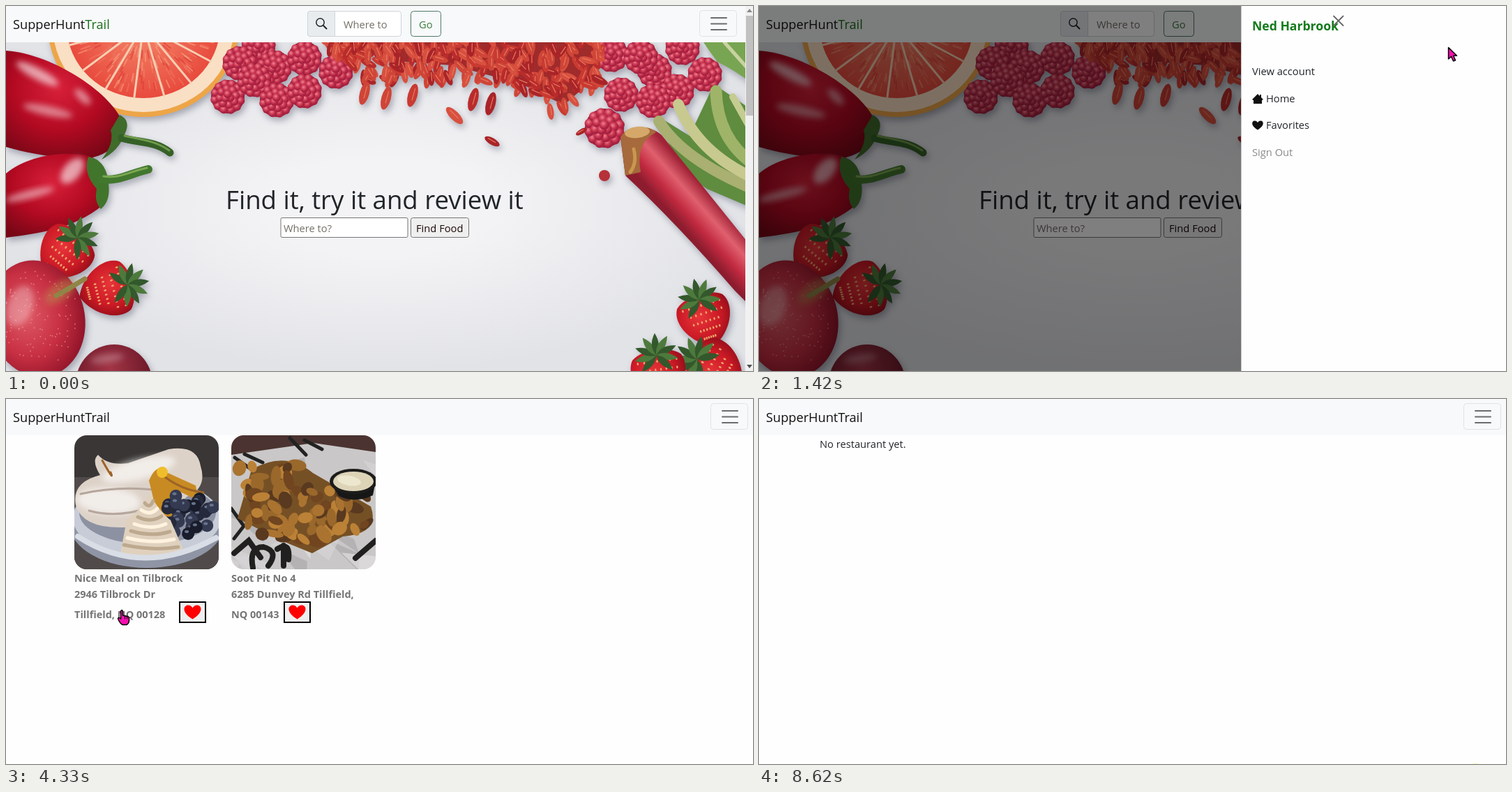
Recreate the animation shown at these times as an HTML page. Size 1071 by 523 pixels, loop 8680 ms.

```html
<!DOCTYPE html>
<html lang="en">
<head>
<meta charset="utf-8">
<title>Restaurant favorites</title>
<style>
html, body { margin: 0; width: 100%; height: 100%; overflow: hidden; background: #fefefe; }
svg { display: block; width: 100vw; height: 100vh; }
text { font-family: "Open Sans", "Noto Sans", sans-serif; white-space: pre; }
</style>
</head>
<body>
<svg id="stage" viewBox="0 0 1071 523" xmlns="http://www.w3.org/2000/svg">
<defs>
  <radialGradient id="table"><stop offset=".3" stop-color="#f3f3f5"/><stop offset="1" stop-color="#e2e3e7"/></radialGradient>
  <radialGradient id="drupe" cx=".4" cy=".35"><stop offset="0" stop-color="#ee8597"/><stop offset=".5" stop-color="#d3415a"/><stop offset="1" stop-color="#a92140"/></radialGradient>
  <radialGradient id="red" cx=".4" cy=".4" r=".65"><stop offset="0" stop-color="#e8353a"/><stop offset=".6" stop-color="#cb1a26"/><stop offset="1" stop-color="#8e0d18"/></radialGradient>
  <radialGradient id="pepper" cx=".45" cy=".35" r=".7"><stop offset="0" stop-color="#d8203a"/><stop offset=".55" stop-color="#b30a22"/><stop offset="1" stop-color="#780716"/></radialGradient>
  <radialGradient id="apple" cx=".4" cy=".45" r=".6"><stop offset="0" stop-color="#df5a65"/><stop offset=".6" stop-color="#c72f42"/><stop offset="1" stop-color="#94152a"/></radialGradient>
  <radialGradient id="plum" cx=".45" cy=".3" r=".7"><stop offset="0" stop-color="#a33546"/><stop offset="1" stop-color="#5b1020"/></radialGradient>
  <radialGradient id="flesh"><stop offset="0" stop-color="#f58a6c"/><stop offset="1" stop-color="#e84b3d"/></radialGradient>
  <linearGradient id="stalk" gradientUnits="userSpaceOnUse" x1="1000" y1="260" x2="955" y2="300"><stop offset="0" stop-color="#a02336"/><stop offset=".35" stop-color="#e0606e"/><stop offset=".7" stop-color="#c22a40"/><stop offset="1" stop-color="#8c1c2e"/></linearGradient>
  <linearGradient id="sky" x2="0" y2="1"><stop offset="0" stop-color="#8eabc9"/><stop offset="1" stop-color="#e6ebef"/></linearGradient>
  <filter id="soft" x="-50%" y="-50%" width="200%" height="200%"><feGaussianBlur stdDeviation="4"/></filter>
  <clipPath id="hero"><rect y="52" width="1071" height="471"/></clipPath>
  <clipPath id="photo"><rect width="207" height="192" rx="18"/></clipPath>
</defs>
</svg>
<script>
const LOOP = 8680;
const stage = document.getElementById('stage');

let seed = 7;
const rnd = (lo = 0, hi = 1) => {
  seed = (seed * 16807) % 2147483647;
  return lo + (hi - lo) * seed / 2147483647;
};
const pick = list => list[Math.floor(rnd(0, list.length))];
const repeat = (n, fn) => Array.from({ length: n }, (_, i) => fn(i)).join('');

// Drawing helpers
const path = (d, fill, more = '') => `<path d="${d}" fill="${fill}" ${more}/>`;
const line = (d, color, width, more = '') =>
  path(d, 'none', `stroke="${color}" stroke-width="${width}" stroke-linecap="round" ${more}`);
const oval = (x, y, rx, ry, fill, rot = 0, more = '') =>
  `<ellipse cx="${x}" cy="${y}" rx="${rx}" ry="${ry}" fill="${fill}" transform="rotate(${rot} ${x} ${y})" ${more}/>`;
const box = (x, y, w, h, fill, more = '') =>
  `<rect x="${x}" y="${y}" width="${w}" height="${h}" fill="${fill}" ${more}/>`;
const text = (x, y, str, size = 14.7, fill = '#212529', more = '') =>
  `<text x="${x}" y="${y}" font-size="${size}" fill="${fill}" ${more}>${str}</text>`;
const at = (x, y, body, more = '') => `<g transform="translate(${x} ${y}) ${more}">${body}</g>`;
const group = (id, body) => `<g id="${id}">${body}</g>`;
const shine = (x, y, rx, ry, rot, opacity = .6) =>
  oval(x, y, rx, ry, '#fff', rot, `opacity="${opacity}" filter="url(#soft)"`);
const heart = fill => path('M0 10C-18-1-12-11-6-10C-3-10-1-8 0-6C1-8 3-10 6-10C12-11 18-1 0 10Z', fill);

// Fruit
const raspberry = (x, y, r = 24) => oval(x, y, r, r, '#9c1d3a') +
  [[12, .8], [8, .48], [3, .16]].map(([n, ring]) => repeat(n, i => {
    const a = i / n * 2 * Math.PI + ring * 3;
    return oval(x + Math.cos(a) * r * ring, y + Math.sin(a) * r * ring, r * .25, r * .25, 'url(#drupe)');
  })).join('');

const leaf = 'M0 0Q10-12 2-30Q-9-14 0 0Z';
const strawberry = (x, y, scale, rot) => at(x, y,
  path('M0 44C-30 32-48-4-35-24C-20-38 20-38 35-24C48-4 30 32 0 44Z', 'url(#red)') +
  repeat(34, i => {
    const row = Math.floor(i / 7), reach = 28 - row * 4.5;
    return oval((i % 7 - 3 + row % 2 / 2) / 3 * reach, -18 + row * 12, 1.3, 2, '#eda36a');
  }) +
  repeat(9, i => at(0, -27, path(leaf, i % 2 ? '#4d7a3c' : '#33582c'), `rotate(${i * 34 - 136}) scale(1.05)`)),
  `rotate(${rot}) scale(${scale})`);

const grapefruit = oval(197, 28, 137, 131, '#eda548') + oval(197, 28, 130, 124, '#f9dfc4') +
  oval(197, 28, 110, 104, 'url(#flesh)') +
  repeat(160, () => {
    const a = rnd(0, Math.PI), d = rnd(25, 92), c = Math.cos(a), s = Math.sin(a);
    return line(`M${197 + c * d} ${28 + s * d}l${c * 12} ${s * 11}`, pick(['#f9a184', '#d93a33', '#f27660']), 2, 'opacity=".6"');
  }) +
  repeat(9, i => {
    const a = i * Math.PI / 8 + .12;
    return line(`M197 28L${197 + 110 * Math.cos(a)} ${28 + 104 * Math.sin(a)}`, '#f8cdb2', 3);
  });

const peppers =
  path('M0 64C62 68 142 118 164 160C174 194 144 221 100 219C58 216 24 209 0 202Z', 'url(#pepper)') +
  shine(45, 97, 34, 8, 28) + shine(60, 150, 36, 7, 12, .45) + shine(110, 130, 15, 6, 45, .5) +
  path('M163 156Q180 164 170 184Q162 207 137 220Q156 196 150 178Z', '#3f6b2b') +
  line('M166 189C190 196 214 193 235 210', '#356026', 11) + line('M170 186C196 192 214 193 234 207', '#6f9a4b', 3) +
  path('M0 240C32 214 84 206 122 216C148 228 153 264 139 285C98 320 44 326 0 332Z', 'url(#pepper)') +
  shine(95, 236, 12, 22, 40) + shine(34, 270, 36, 6, -14, .5) +
  path('M118 216Q142 220 146 248Q152 278 136 291Q126 280 130 262Q110 240 118 216Z', '#41752c') +
  line('M138 248C160 252 178 240 204 234', '#42772e', 12) + line('M140 244C162 248 180 236 202 232', '#7aa851', 3);

const apples = oval(44, 448, 69, 84, 'url(#apple)', -12) +
  repeat(110, () => {
    const a = rnd(0, 6.28), d = Math.sqrt(rnd()) * .92;
    return oval(44 + 66 * d * Math.cos(a), 450 + 78 * d * Math.sin(a), 1, 1, '#f3a5a1', 0, 'opacity=".55"');
  }) + shine(20, 430, 18, 30, 20, .3) +
  oval(78, 409, 26, 13, '#b98a4d', -35, 'opacity=".5" filter="url(#soft)"') +
  line('M72 415Q92 404 113 391', '#8f8546', 7) + oval(155, 541, 55, 56, 'url(#plum)') + shine(145, 505, 24, 6, -8, .25);

const pileDepth = x => 60 * Math.min(1, (x - 452) / 60) + 46 * Math.exp(-(((x - 790) / 50) ** 2));
const gojiColors = ['#c93a32', '#b92c2b', '#d8503f', '#a92428', '#cf4537'];
const goji = (x, y, size = 12, rot = rnd(15, 125)) => at(x, y,
  oval(0, 0, size, size * .4, pick(gojiColors)) + line(`M${-size * .6} -1L${size * .4} -1`, '#e87b62', 1.2), `rotate(${rot})`);
const gojiPile = path('M488 52L545 78L640 85L740 112L800 142L850 98V52Z', '#9f2b2b') +
  repeat(260, () => {
    const x = rnd(463, 856);
    return goji(x, 48 + pileDepth(x) * rnd());
  }) +
  [[514, 125], [545, 132], [583, 128], [670, 134], [695, 140]].map(([x, y]) => goji(x, y, 17, 105)).join('') +
  goji(643, 157, 16, 45) + goji(697, 194, 12, 30) + goji(825, 180, 9, -30) + oval(858, 243, 8, 8, '#b63138');

const berries = [[362, 60], [385, 88], [335, 82], [318, 130], [356, 106], [388, 135], [428, 75], [428, 122], [473, 94],
  [868, 70], [930, 93], [910, 73], [970, 60], [1002, 98], [962, 122], [882, 127], [928, 136]]
  .map(([x, y]) => raspberry(x, y)).join('') + raspberry(858, 175, 28);

const rhubarb =
  path('M1000 52H1071V112Q1045 92 1020 80Q1008 64 1000 52Z', '#78a552') + line('M1030 52L1071 98', '#c9d2a0', 5) +
  path('M938 160L980 186L1015 112L1071 150V290L1005 262Q955 232 938 160Z', '#5f8c3f') +
  line('M936 165Q970 220 1071 262', '#a9b071', 16) + line('M964 141Q992 210 1071 246', '#c8c98e', 16) +
  line('M1018 122Q1020 190 1071 226', '#9fb468', 17) + line('M1042 130L1071 182', '#c4cc91', 10) +
  path('M881 188C890 170 924 170 940 185L1071 348V434L1045 408Q960 310 888 243Z', 'url(#stalk)') +
  path('M881 188C890 170 924 170 932 181Q902 196 910 238L888 243Z', '#a66a3c') +
  oval(905, 181, 18, 8, '#d5a869', -6) + line('M900 205Q905 225 895 238', '#c9974d', 5);

const photo = box(0, 52, 1071, 471, 'url(#table)') +
  `<g style="filter:drop-shadow(3px 5px 5px #50556a70)">` + grapefruit + peppers + strawberry(85, 353, 1, 40) +
  strawberry(148, 406, 1, 76) + apples + berries + gojiPile + rhubarb + strawberry(1002, 446, .98, -18) +
  strawberry(1015, 520, 1.05, -60) + strawberry(936, 527, 1, -8) + '</g>';

// Page furniture
const logo = color => text(10, 33, `SupperHunt<tspan fill="${color}">Trail</tspan>`, 18.2, '#111');
const burger = x => box(x + .5, 6.5, 53, 37, 'none', 'rx="4" stroke="#e0e2e4"') +
  [17, 25.5, 34].map(y => line(`M${x + 17} ${y}h22`, '#6b6c6d', 2)).join('');
const navbar = box(0, 0, 1071, 52, '#f8f9fa');

const home = `<g clip-path="url(#hero)">${photo}</g>` + navbar + logo('#1b6f1b') +
  box(432.5, 7.5, 134, 36, '#fff', 'rx="4" stroke="#ced4da"') +
  path('M436 7.5H471.5V43.5H436Q432.5 43.5 432.5 40V11Q432.5 7.5 436 7.5Z', '#e9ecef', 'stroke="#ced4da"') +
  '<circle cx="450.5" cy="23.5" r="5.7" fill="none" stroke="#212529" stroke-width="1.5"/>' +
  line('M455 28L459.5 32.5', '#212529', 2) + text(484, 32, 'Where to', 14.7, '#757068') +
  box(580.5, 7.5, 43, 36, 'none', 'rx="4" stroke="#4f7a68"') + text(592, 32, 'Go', 14.7, '#3c7a3c') + burger(994) +
  text(315, 291, 'Find it, try it and review it', 36.6) +
  box(394, 303.5, 182, 28, '#fff', 'rx="2" stroke="#767676"') + text(398, 324, 'Where to?', 14.7, '#757068') +
  box(580.5, 303.5, 83, 28, '#efefef', 'rx="3" stroke="#767676"') + text(588, 324, 'Find Food', 14.7, '#1c0808') +
  group('scrollbar', box(1060, 0, 11, 523, '#f1f1f1') + box(1061, 14, 10, 143, '#c1c1c1') +
    path('M1062 9L1066 4L1070 9Z', '#8a8a8a') + path('M1062 514L1066 519L1070 514Z', '#505050'));

const panel = box(0, 0, 400, 523, '#fefefe') + box(0, 0, 1, 523, '#c9cacb') +
  text(16, 35, 'Ned Harbrook', 17.6, '#157a1c', 'font-weight="700"') +
  line('M133 14.5L146.5 28M146.5 14.5L133 28', '#666', 1.8) +
  text(16, 99, 'View account') + text(36, 138, 'Home') + text(36, 176, 'Favorites') + text(16, 215, 'Sign Out', 14.7, '#8a8a8a') +
  at(24, 133, path('M-8 1L0-7L3-4V-6H5V-2L8 1L6 2V7H-6V2Z', '#111')) + at(24, 171, heart('#111'), 'scale(.65)');

const status = (width, str) => path(`M0 505H${width - 4}Q${width} 505 ${width} 509V523H0Z`, '#dee1e6') + text(3, 520, str, 11, '#45484c');

// Food photos, each 207 by 192
const patio = box(0, 0, 207, 192, 'url(#sky)') +
  repeat(12, () => oval(rnd(90, 200), rnd(4, 55), rnd(12, 28), rnd(5, 11), '#edf1f4', 0, 'opacity=".75"')) +
  path('M0 10L50 0L88 14V75H0Z', '#9c8c7a') + box(8, 22, 17, 55, '#d0c2ae') + box(52, 22, 18, 55, '#d0c2ae') +
  box(25, 38, 27, 37, '#5e656a') + box(0, 10, 86, 6, '#ded5c6') +
  repeat(18, () => oval(rnd(125, 210), rnd(42, 68), 13, 11, pick(['#566a49', '#40563d', '#6e7d58']))) +
  box(0, 67, 207, 60, '#6c7274') + box(0, 69, 207, 6, '#202325') + repeat(20, i => box(i * 11, 73, 3, 42, '#292d2f')) +
  path('M92 88Q140 76 194 88V122H90Z', '#282b2d') + path('M0 96L207 108V192H0Z', '#8b6a50') +
  repeat(5, i => line(`M0 ${106 + i * 20}L110 ${112 + i * 22}`, '#563f31', 2)) +
  oval(91, 108, 56, 17, '#e9e9e7') + repeat(24, () => oval(rnd(60, 122), rnd(97, 110), 8, 4, pick(['#d4b574', '#b78f49', '#eee0b4']))) +
  oval(138, 165, 94, 51, '#e8ebf0', 10) + oval(145, 162, 76, 39, '#d6dae1', 10) +
  path('M86 140Q90 106 118 106L204 142V184L142 168Q102 184 86 140Z', '#c7a36f') +
  repeat(55, () => line(`M${rnd(98, 200)} ${rnd(104, 146)}l${rnd(-9, 12)} ${rnd(5, 17)}`, pick(['#50713a', '#82964f', '#37522b']), 4)) +
  oval(113, 144, 19, 28, '#d8c49c', 22) + oval(113, 146, 12, 20, '#927346', 22) +
  path('M132 164L172 152L190 192H136Z', '#d9ba79') + path('M176 166L207 150V192H184Z', '#b46d32') +
  box(0, 66, 9, 60, '#c5ced2', 'opacity=".75"');

const dessert = box(0, 0, 207, 192, '#393635') + path('M0 60H207V192H0Z', '#504b4a') +
  oval(104, 127, 111, 63, '#8f95a5') + oval(104, 119, 106, 56, '#c7ccd7') + oval(105, 111, 98, 45, '#8d92a2') +
  path('M2 100Q-4 67 37 57Q24 36 34 28Q48 44 77 40L135 20Q176 13 181 44Q191 76 161 88Q130 130 72 132Q12 134 2 100Z', '#ddd2c8') +
  shine(92, 49, 54, 15, -14, .6) + shine(49, 94, 46, 19, 4, .6) +
  line('M9 84Q67 71 130 80M21 108Q60 119 107 104', '#b5a69b', 3) +
  path('M107 65Q118 38 132 53L174 72L178 94L150 80L133 152L116 102Z', '#c88b23') +
  line('M40 36Q58 68 52 53M124 55Q151 78 185 82', '#9d6424', 3) + oval(126, 53, 8, 8, '#f0bd2c') +
  repeat(29, () => {
    const x = rnd(132, 199), y = rnd(83, 143) + (x - 160) * .17;
    return oval(x, y, 9, 9, pick(['#25293b', '#343a51', '#191c2a'])) + oval(x - 2, y - 3, 3, 2, '#68738c');
  }) +
  path('M66 170L75 121Q99 104 108 83Q119 106 138 122L158 168Q108 182 66 170Z', '#dfd1bd') +
  repeat(7, i => line(`M${101 - i * 5} ${97 + i * 10}Q${108 + i} ${106 + i * 10} ${113 + i * 6} ${94 + i * 11}`, i % 2 ? '#fff3df' : '#bda98f', 5)) +
  line('M5 145Q97 205 203 147', '#d9dde6', 8);

const wings = box(0, 0, 207, 192, '#c9c7c7') + path('M0 0H207V24L118 11L0 28Z', '#4a3330') +
  repeat(18, () => path(`M${rnd(-20, 190)} ${rnd(18, 180)}l${rnd(20, 60)} ${rnd(-25, 25)}l${rnd(-30, 10)} ${rnd(15, 35)}Z`,
    pick(['#e3e2e3', '#aaa8aa', '#d7d6d8']), 'opacity=".65"')) +
  line('M5 32L36 54M19 27L45 39M84 4L107 28M105 7L130 20M0 105L18 130L4 148', '#222', 5) +
  line('M4 169L25 151L42 175M31 190Q25 160 46 160Q69 166 53 187M75 158V187M66 163Q85 151 82 178M178 176L207 151', '#20201f', 8) +
  path('M29 49Q78 21 117 54L200 102Q214 141 160 145L116 169L72 151L9 119Z', '#765025') +
  repeat(125, () => {
    const x = rnd(10, 196), y = rnd(40, 153);
    if (x < 35 && y > 125 || x > 105 && y < 75 || x > 135 && y > 138) return '';
    return oval(x, y, rnd(7, 15), rnd(5, 10), pick(['#9a682b', '#bb8136', '#70451f', '#aa7330', '#59391f']), rnd(0, 180));
  }) +
  path('M141 65L207 65L203 86Q178 98 154 87Z', '#171717') + oval(175, 66, 34, 18, '#1d1c1b') +
  oval(175, 66, 29, 14, '#ddd4b8') + oval(169, 65, 17, 7, '#eee7d0', 10);

const card = (id, picture, lines, buttonX) => group(id,
  at(0, 52, `<g clip-path="url(#photo)">${picture}</g>`) +
  lines.map((str, i) => text(0, [262, 285, 314][i], str, 14.5, '#757575', 'font-weight="700"')).join('') +
  box(buttonX + 1, 291, 37, 29, '#efefef', 'stroke="#000" stroke-width="2"') + at(buttonX + 19.5, 305.5, heart('#f00')));

const favorites = box(0, 0, 1071, 523, '#fefefe') + navbar + logo('#111') + burger(1010) +
  card('first', patio, ['Odell’s Kettle &amp; Larder', '3957 Fern Rd Tillfield, NQ', '00117'], 49) +
  card('second', dessert, ['Nice Meal on Tilbrock', '2946 Tilbrock Dr', 'Tillfield, NQ 00128'], 150) +
  card('third', wings, ['Soot Pit No 4', '6285 Dunvey Rd Tillfield,', 'NQ 00143'], 75) +
  group('empty', text(87, 70, 'No restaurant yet.')) + group('speck', box(1024, 522, 6, 1, '#fbf7a8'));

const outline = 'stroke="#000" stroke-width="1.5" stroke-linejoin="round"';
const pink = '#f50fae';
const cursor =
  group('arrow', path('M.5 .5V17L4.5 13.5L7.5 20L10.5 18.7L7.6 12.3H12.5Z', pink, outline)) +
  group('hand', path('M-1.5 2Q0-1 1.5 2V8L8.5 9.5Q10.5 10 10.5 13V16Q10 20 7 21.5H1Q-2 20-4 16L-5.5 12.5Q-4.5 10-1.5 13Z', pink, outline) +
    line('M4.5 9V13M7.5 10V13', '#000', 1)) +
  group('beam', line('M-3-9H3M0-9V9M-3 9H3', '#111', 5) + line('M-3-9H3M0-9V9M-3 9H3', pink, 1.6));

// The favorites page is opaque and simply covers the home page.
stage.insertAdjacentHTML('beforeend',
  home + group('shade', box(0, 0, 1071, 523, '#000')) + group('panel', panel) +
  group('waiting', status(356, 'Waiting for 172.19.86.222...')) +
  group('favorites', favorites + group('link', status(316, '172.19.86.222:5000/rest_details/rnPPn7LTM9yuqkx7Gg9U6A'))) +
  group('cursor', cursor));

// Motion
const track = (id, stops, easing = 'linear') => document.getElementById(id).animate(
  stops.map(([time, frame, ease = easing]) => ({ offset: time / LOOP, easing: ease, ...frame })),
  { duration: LOOP, iterations: Infinity });
const show = (id, ...spans) => {
  const stops = spans.flatMap(([from, to]) => [[from, { opacity: 1 }], [to, { opacity: 0 }]]);
  if (stops[0][0] > 0) stops.unshift([0, { opacity: 0 }]);
  if (stops.at(-1)[0] < LOOP) stops.push([LOOP, { opacity: 0 }]);
  track(id, stops, 'step-end');
};
const move = (x, y = 0) => ({ transform: `translate(${x}px, ${y}px)` });

show('scrollbar', [0, 1080]);
show('waiting', [2380, 2570]);
show('favorites', [2570, LOOP]);
show('link', [3300, 3740]);
show('empty', [6590, LOOP]);
show('speck', [8620, LOOP]);

track('shade', [[0, { opacity: 0 }], [1105, { opacity: 0 }], [1255, { opacity: .5 }], [LOOP, { opacity: .5 }]]);
track('panel', [[0, move(1075)], [1110, move(1075), 'ease-in-out'], [1410, move(691)], [LOOP, move(691)]]);

show('first', [2570, 4330]);
show('second', [2570, 5400]);
show('third', [2570, 6590]);
track('first', [[0, move(98)], [LOOP, move(98)]]);
track('second', [[0, move(323)], [4330, move(98)], [LOOP, move(98)]], 'step-end');
track('third', [[0, move(548)], [4330, move(323)], [5400, move(98)], [LOOP, move(98)]], 'step-end');

show('cursor', [210, 7950]);
show('arrow', [210, 820], [1400, 2200], [2380, 3800], [6950, LOOP]);
show('hand', [820, 1110], [2200, 2380], [3800, 6950]);
show('beam', [1110, 1400]);
track('cursor', [
  [0, 732, 438], [210, 732, 438], [880, 1041, 17], [1080, 1041, 17], [1150, 1040, 30], [1280, 1040, 30],
  [1890, 815, 155], [2200, 775, 167], [3100, 775, 167], [3530, 289, 328], [3940, 166, 302], [4530, 166, 302],
  [5000, 268, 297], [5730, 268, 297], [5990, 199, 310], [6880, 199, 310], [7080, 902, 312],
  [7550, 902, 312], [7750, 1024, 507], [7890, 1024, 507], [7950, 1024, 523], [LOOP, 1024, 523],
].map(([time, x, y]) => [time, move(x, y)]));
</script>
</body>
</html>
```
